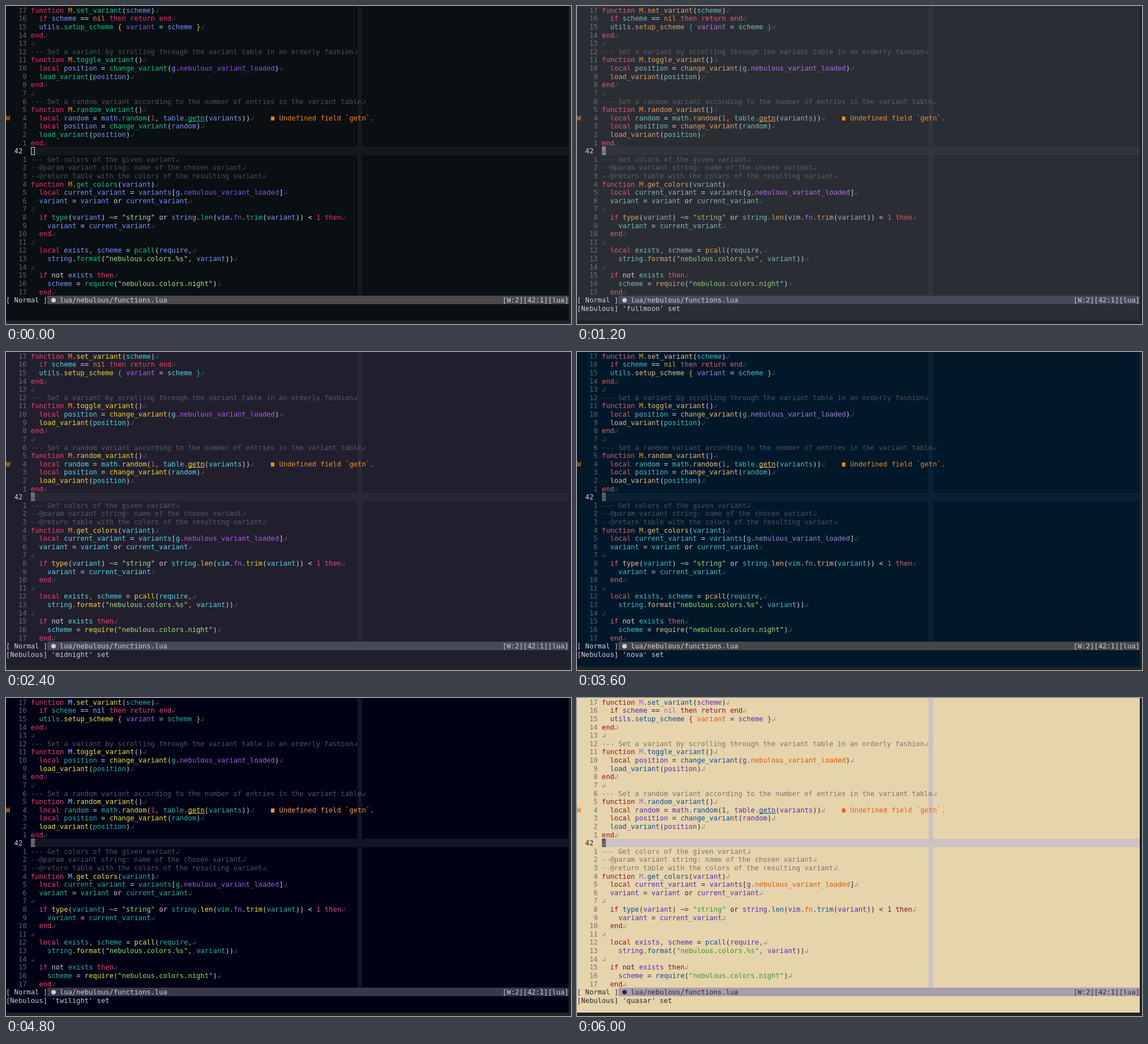
An HTML page with a canvas that plays this animation: 998 by 561 pixels, repeating every 7200 ms.

```html
<!DOCTYPE html>
<html lang="en">
<head>
<meta charset="utf-8">
<title>Color scheme variants</title>
<style>
html, body { margin: 0; width: 100%; height: 100%; overflow: hidden; background: #222324; }
canvas { display: block; }
</style>
</head>
<body>
<canvas id="stage" width="998" height="561"></canvas>
<script>
const ctx = document.getElementById('stage').getContext('2d');
const CW = 7.309, RH = 14.61, HOLD = 1200;
const CODE_COL = 6, CURSOR_ROW = 17, STATUS_ROW = 35;
const FONT = '12.14px "DejaVu Sans Mono", "Noto Sans Mono", monospace';

const code = `function M.set_variant(scheme)
  if scheme == nil then return end
  utils.setup_scheme { variant = scheme }
end

--- Set a variant by scrolling through the variant table in an orderly fashion
function M.toggle_variant()
  local position = change_variant(g.nebulous_variant_loaded)
  load_variant(position)
end

--- Set a random variant according to the number of entries in the variant table
function M.random_variant()
  local random = math.random(1, table.getn(variants))
  local position = change_variant(random)
  load_variant(position)
end

--- Get colors of the given variant
--@param variant string: name of the chosen variant
--@return table with the colors of the resulting variant
function M.get_colors(variant)
  local current_variant = variants[g.nebulous_variant_loaded]
  variant = variant or current_variant

  if type(variant) ~= "string" or string.len(vim.fn.trim(variant)) < 1 then
    variant = current_variant
  end

  local exists, scheme = pcall(require,
    string.format("nebulous.colors.%s", variant))

  if not exists then
    scheme = require("nebulous.colors.night")
  end`.split('\n');

const themes = [
  { name: '', bg: '#0a0f14', line: '#15191e', fg: '#ced5e2', keyword: '#ec2f6d',
    ident: '#7896f0', func: '#10c28c', string: '#abdc8d', prop: '#8a50df',
    constant: '#fa8c0c', brace: '#f5c131', delim: '#f5a623', comment: '#4c5256',
    num: '#5f6468', eol: '#3d4247', warn: '#f5820b', bar: '#4a4849', cursor: '#ced5e2' },
  { name: 'fullmoon', bg: '#2b2d35', line: '#32353e', fg: '#c9ced8', keyword: '#df5f6b',
    ident: '#80b7b3', func: '#d3a36b', string: '#8fc77f', prop: '#a873d6',
    constant: '#e59035', brace: '#3aa5a5', delim: '#d8913a', comment: '#5c5f66',
    num: '#6c6f76', eol: '#52555c', warn: '#e59035', bar: '#444a59', cursor: '#85868a' },
  { name: 'midnight', bg: '#211f2e', line: '#292836', fg: '#cfcfd6', keyword: '#ee446c',
    ident: '#56d4dd', func: '#efd33a', string: '#a7e08a', prop: '#b05aec',
    constant: '#eb8f32', brace: '#29bcbf', delim: '#eb8f32', comment: '#5a5963',
    num: '#6a6972', eol: '#504f5a', warn: '#eb8f32', bar: '#464a58', cursor: '#75736f' },
  { name: 'nova', bg: '#00182a', line: '#0a2034', fg: '#d2d2e0', keyword: '#df625f',
    ident: '#45bfc4', func: '#e8bd80', string: '#9cdc70', prop: '#9c83d5',
    constant: '#e2a432', brace: '#e2c23a', delim: '#e2a432', comment: '#4b545c',
    num: '#5b646c', eol: '#424c55', warn: '#e08a2a', bar: '#454649', cursor: '#5e5e5e' },
  { name: 'twilight', bg: '#010115', line: '#141425', fg: '#ccccd5', keyword: '#f2427a',
    ident: '#23b899', func: '#ebe63c', string: '#7bea6f', prop: '#a75aee',
    constant: '#5fd2f0', brace: '#f0b32c', delim: '#f09a4a', comment: '#55555e',
    num: '#65656e', eol: '#484852', warn: '#f09a4a', bar: '#373a49', cursor: '#6b6b6f' },
  { name: 'quasar', bg: '#e6d4ac', line: '#cdc2c2', fg: '#2a2a33', keyword: '#8e1226',
    ident: '#5a2ab3', func: '#0f4e95', string: '#3f9426', prop: '#dc5a0c',
    constant: '#9a68c9', brace: '#8e1226', delim: '#55515c', comment: '#7b756b',
    num: '#77726a', eol: '#8d8574', warn: '#ea5c1e', bar: '#a99dae', cursor: '#5e5e62' }
];

const TOKEN = /--.*|"[^"]*"|\w+|[.,]|[{}]|[^\s\w.,{}"]+/g;
const KEYWORDS = /^(function|end|if|then|return|local)$/;

// Colour role of a Lua token, judged by its neighbours
function roleOf(token, before, after) {
  if (token.startsWith('--')) return 'comment';
  if (token[0] === '"') return 'string';
  if (KEYWORDS.test(token) || /^\d+$/.test(token)) return 'keyword';
  if (/^(M|nil)$/.test(token)) return 'constant';
  if (/^(or|not)$/.test(token)) return 'fg';
  if (/^[.,]$/.test(token)) return 'delim';
  if (/^[{}]$/.test(token)) return 'brace';
  if (!/^\w/.test(token)) return 'fg';
  if (after[0] === '(' || after.startsWith(' {')) return 'func';
  return /(\.|\{ )$/.test(before) ? 'prop' : 'ident';
}

const tokens = code.map(text => [...text.matchAll(TOKEN)].map(m => ({
  text: m[0],
  col: CODE_COL + m.index,
  role: roleOf(m[0], text.slice(0, m.index), text.slice(m.index + m[0].length))
})));

function write(text, col, row, color) {
  ctx.fillStyle = color;
  ctx.fillText(text, col * CW, row * RH + 11.8);
}

// Fills a block of character cells, snapped to whole pixels
function cells(col, row, cols, rows, color) {
  const x = Math.round(col * CW), y = Math.round(row * RH);
  ctx.fillStyle = color;
  ctx.fillRect(x, y, Math.round((col + cols) * CW) - x, Math.round((row + rows) * RH) - y);
}

function drawCursor(t, focused) {
  if (focused) return cells(CODE_COL, CURSOR_ROW, 1, 1, t.cursor);
  ctx.strokeStyle = t.cursor;
  ctx.lineWidth = 1;
  ctx.strokeRect(44.5, 249.5, 6, 13);
}

function drawCode(t) {
  tokens.forEach((line, row) => {
    const current = row === CURSOR_ROW;
    const label = String(current ? 42 : Math.abs(row - CURSOR_ROW));
    write(label, current ? 2 : 5 - label.length, row, current ? t.fg : t.num);
    for (const k of line) {
      write(k.text, k.col, row, t[k.role]);
      if (k.text === 'getn') ctx.fillRect(k.col * CW, row * RH + 13, 4 * CW, 1);
    }
    write('↲', CODE_COL + code[row].length, row, t.eol);
  });
}

function drawWarning(t) {
  write('W', 0, 13, t.warn);
  ctx.fillRect(468, 195, 6, 7);
  write('Undefined field `getn`.', 66, 13, t.warn);
}

function drawStatus(t) {
  cells(10, STATUS_ROW, 126, 1, t.bar);
  write('[ Normal ]', 0, STATUS_ROW, t.fg);
  ctx.beginPath();
  ctx.arc(84, 519, 4, 0, Math.PI * 2);
  ctx.fill();
  write('lua/nebulous/functions.lua', 13, STATUS_ROW, t.fg);
  write('[W:2][42:1][lua]', 120, STATUS_ROW, t.fg);
  if (t.name) write(`[Nebulous] '${t.name}' set`, 0, STATUS_ROW + 1, t.fg);
}

function draw(t) {
  ctx.font = FONT;
  ctx.textBaseline = 'alphabetic';
  ctx.fillStyle = '#222324';
  ctx.fillRect(0, 0, 998, 561);
  cells(0, 0, 136, 38, t.bg);
  cells(85, 0, 1, STATUS_ROW, t.line);
  cells(CODE_COL, CURSOR_ROW, 130, 1, t.line);
  drawCursor(t, t.name !== '');
  drawCode(t);
  drawWarning(t);
  drawStatus(t);
}

let shown = -1;
const start = performance.now();
function tick(now) {
  const index = Math.floor(Math.max(0, now - start) / HOLD) % themes.length;
  if (index !== shown) draw(themes[shown = index]);
  requestAnimationFrame(tick);
}
tick(start);
</script>
</body>
</html>
```
